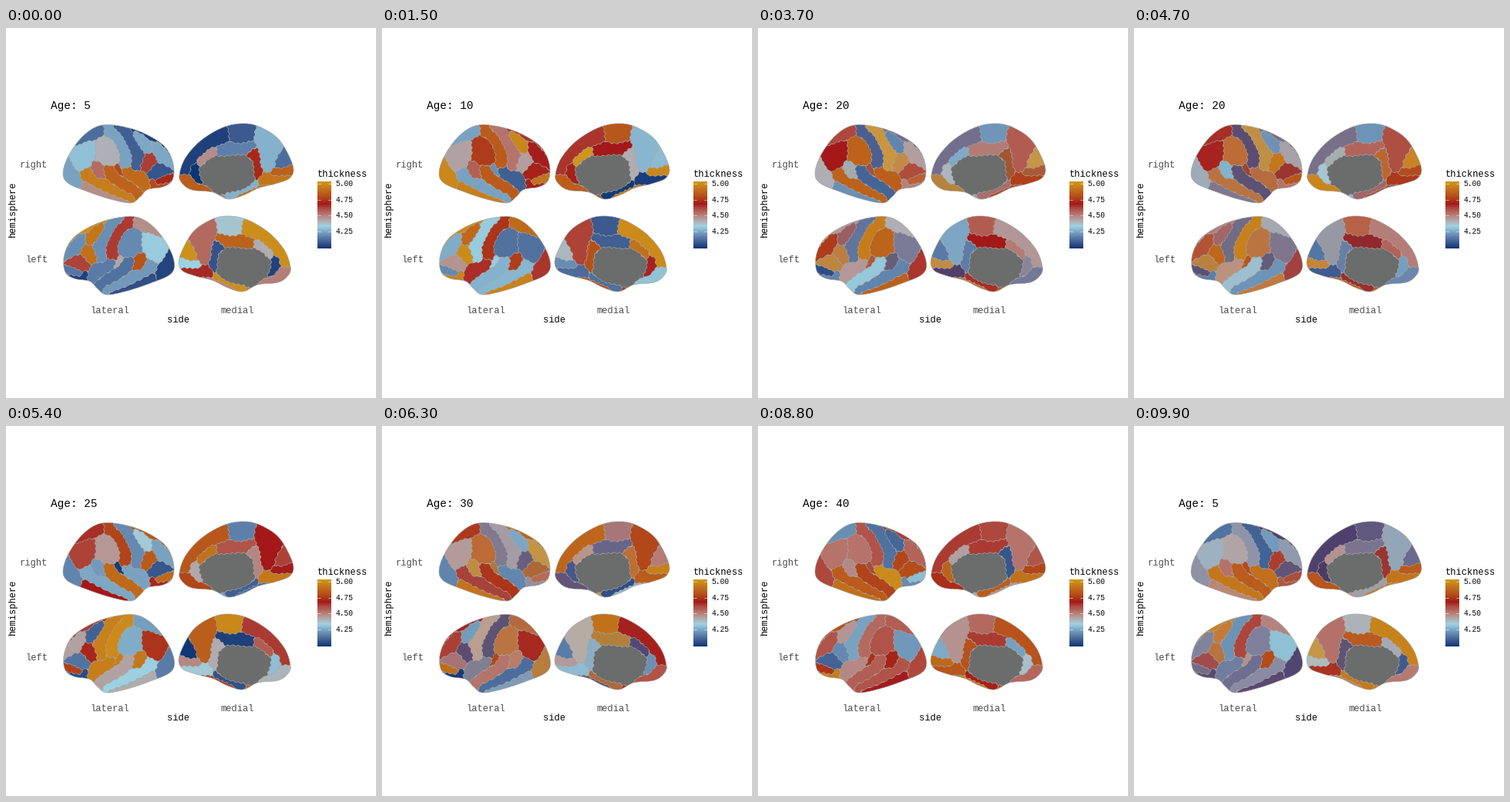
Write a matplotlib script that moves like this. It is 480x480 px and loops after 10 s.

```python
import numpy as np
import matplotlib.pyplot as plt
from matplotlib.animation import FuncAnimation
from matplotlib.patches import Polygon
from matplotlib.path import Path

SIZE, FRAMES, INTERVAL = 480, 100, 100
AGES = np.arange(5, 45, 5)
FADE = 5
PT = 0.72  # points per pixel at 100 dpi
MONO = "Liberation Mono"
EDGE, GREY, WHITE = (166, 168, 164), (108, 108, 108), (255, 255, 255)
X0, X1, Y0, Y1, SUB = 70, 380, 120, 350, 3  # painted box and subpixels

rng = np.random.default_rng(12)

# --- colour scale, interpolated in CIE Lab ---------------------------------
M = np.array([[0.4124, 0.3576, 0.1805],
              [0.2126, 0.7152, 0.0722],
              [0.0193, 0.1192, 0.9505]])
WP = M.sum(axis=1)


def to_lab(rgb):
    c = np.asarray(rgb, float) / 255
    lin = np.where(c > 0.04045, ((c + 0.055) / 1.055) ** 2.4, c / 12.92)
    t = lin @ M.T / WP
    f = np.where(t > 0.008856, np.cbrt(t), 7.787 * t + 16 / 116)
    x, y, z = np.moveaxis(f, -1, 0)
    return np.stack([116 * y - 16, 500 * (x - y), 200 * (y - z)], -1)


def to_rgb(lab):
    L, a, b = np.moveaxis(np.asarray(lab, float), -1, 0)
    y = (L + 16) / 116
    f = np.stack([y + a / 500, y, y - b / 200], -1)
    t = np.where(f > 0.2069, f ** 3, (f - 16 / 116) / 7.787)
    lin = np.clip((t * WP) @ np.linalg.inv(M).T, 0, 1)
    return np.clip(np.where(lin > 0.0031308, 1.055 * lin ** (1 / 2.4) - 0.055,
                            12.92 * lin), 0, 1)


STOPS = to_lab([(10, 52, 114), (158, 210, 226), (164, 22, 25), (208, 152, 26)])


def scale(v):
    """Lab colours for values from 0 (thin) to 100 (thick)."""
    pos = np.linspace(0, 100, len(STOPS))
    return np.stack([np.interp(v, pos, s) for s in STOPS.T], -1)


# --- geometry ---------------------------------------------------------------
def smooth(flat, n=10):
    """Closed Catmull-Rom curve."""
    p = np.reshape(flat, (-1, 2)).astype(float)
    a, b, c, d = (np.roll(p, s, axis=0)[:, None] for s in (1, 0, -1, -2))
    t = np.linspace(0, 1, n, endpoint=False)[None, :, None]
    q = 0.5 * (2 * b + (c - a) * t + (2 * a - 5 * b + 4 * c - d) * t ** 2
               + (3 * b - a - 3 * c + d) * t ** 3)
    return q.reshape(-1, 2)


def spine_dist(p, spine):
    """Distance from points to a polyline."""
    best = np.inf
    for a, b in zip(spine[:-1], spine[1:]):
        t = np.clip((p - a) @ (b - a) / ((b - a) @ (b - a)), 0, 1)
        best = np.minimum(best, np.hypot(*(p - a - t[:, None] * (b - a)).T))
    return best


def waver(p):
    x, y = p.T
    return p + np.stack([0.7 * np.sin(0.9 * y + 0.35 * x),
                         0.7 * np.sin(0.85 * x - 0.4 * y)], 1)


class View:
    """One face of the right hemisphere; the left one is its mirror image."""

    def __init__(self, outline, mirror, width, drop):
        self.outline = smooth(outline)
        self.mirror, self.width, self.drop = mirror, width, drop
        self.areas, self.tracks = [], ([], [])

    def area(self, radius, spine, right=None, left=None):
        """Rounded cell around a spine; unkeyed areas vary at random."""
        self.areas.append((radius, np.reshape(spine, (-1, 2)).astype(float)))
        for track, keys in zip(self.tracks, (right, left)):
            track.append(scale(rng.uniform(0, 100, len(AGES)) if keys is None else keys))

    def void(self, radius, spine):
        self.area(radius, spine)
        for track in self.tracks:
            track[-1] = np.tile(to_lab(GREY), (len(AGES), 1))

    def flip(self, p):
        return np.stack([self.mirror - self.width * p[:, 0], p[:, 1] + self.drop], 1)

    def unflip(self, p):
        return np.stack([(self.mirror - p[:, 0]) / self.width, p[:, 1] - self.drop], 1)

    def paint(self, labels, grid, left, base):
        """Give each subpixel to its nearest area, -2 along the borders."""
        p = self.unflip(grid) if left else grid
        inside = np.flatnonzero(Path(self.outline).contains_points(p))
        q = waver(p[inside])
        d = np.array([spine_dist(q, s) - r for r, s in self.areas])
        first, second = np.partition(d, 1, axis=0)[:2]
        labels[inside] = np.where(second - first < 0.7, -2, base + d.argmin(axis=0))


lateral = View([74, 187, 82, 164, 100, 140, 122, 126.5, 150, 127.5, 180, 137, 206, 154,
                217, 176, 216, 197, 204, 206, 184, 209.5, 174, 219, 162, 227,
                135, 222, 105, 212, 80, 201], 292.5, 1, 119)
medial = View([225, 190, 233, 168, 254, 145, 284, 128, 312, 124, 335, 131, 356, 147,
               372, 178, 369, 194, 350, 202, 328, 207.5, 308, 217, 288, 222,
               268, 213, 241, 210, 228, 201], 589.5, 0.98, 120)

# superior frontal, seen on both faces
frontal = ([3, 63, 60, 15, 81, 86, 34, 62], [97, 96, 30, 47, 62, 67, 31, 80])
lateral.area(3, [150, 125, 172, 132, 195, 143, 210, 157, 218, 172], *frontal)
medial.area(12, [230, 178, 243, 160, 262, 145, 276, 139], *frontal)
# rostral and caudal middle frontal
lateral.area(8, [197, 156, 210, 172],
             [25, 66, 46, 43, 24, 98, 67, 55], [20, 26, 74, 74, 43, 66, 66, 58])
lateral.area(6, [170, 140, 184, 156])
# precentral, postcentral
lateral.area(7, [145, 124, 157, 137, 166, 155, 172, 165, 168, 180],
             [10, 52, 42, 98, 19, 43, 67, 14], [20, 32, 42, 12, 93, 42, 57, 24])
lateral.area(7, [132, 124, 135, 134, 146, 146, 154, 160, 156, 176],
             [24, 82, 40, 6, 76, 18, 4, 58], [62, 72, 90, 92, 96, 5, 82, 54])
# parietal: supramarginal, superior, inferior
lateral.area(15, [130, 157, 132, 165],
             [40, 74, 84, 84, 45, 83, 74, 52], [19, 14, 84, 85, 26, 85, 75, 58])
lateral.area(10, [98, 141, 118, 130],
             [13, 24, 45, 64, 64, 74, 67, 20], [47, 86, 38, 41, 23, 82, 51, 56])
lateral.area(12, [93, 173, 106, 158],
             [30, 43, 67, 67, 61, 40, 46, 52], [32, 14, 58, 18, 72, 65, 98, 22])
# lateral occipital
lateral.area(11, [80, 180, 85, 199],
             [24, 95, 45, 39, 18, 18, 58, 60], [4, 63, 58, 64, 16, 92, 22, 60])
# temporal: superior, middle, inferior, transverse, sulcal bank
lateral.area(7, [132, 183, 143, 195, 157, 206, 170, 214],
             [84, 82, 33, 6, 86, 69, 4, 76], [14, 27, 33, 31, 43, 54, 75, 56])
lateral.area(6, [104, 190, 122, 202, 140, 212, 160, 220],
             [92, 24, 80, 85, 25, 66, 68, 82], [22, 28, 18, 18, 33, 8, 97, 58])
lateral.area(4, [104, 206, 130, 218, 155, 226])
lateral.area(3, [143, 181, 151, 191])
lateral.area(7, [121, 180, 120, 189])
# insula
lateral.area(8, [158, 187, 172, 194, 179, 203],
             [86, 10, 83, 83, 24, 17, 18, 96], [16, 64, 45, 45, 92, 17, 15, 48])
# inferior frontal and orbital
lateral.area(7, [186, 170, 181, 179])
lateral.area(7, [192, 189, 204, 183])
lateral.area(4, [199, 200, 209, 196])
lateral.area(4, [189, 201, 192, 206, 212, 206])

# paracentral, precuneus
medial.area(15, [305, 126, 305, 136],
            [9, 81, 20, 22, 17, 52, 92, 60], [36, 9, 54, 57, 95, 87, 72, 54])
medial.area(12, [337, 140, 343, 157, 339, 172],
            [27, 28, 55, 57, 67, 79, 43, 52], [54, 61, 24, 25, 83, 37, 73, 46])
# cingulate: posterior, isthmus, caudal and rostral anterior
medial.area(8, [280, 160, 300, 157, 313, 155],
            [17, 67, 30, 54, 58, 12, 67, 62], [84, 10, 67, 67, 3, 98, 67, 62])
medial.area(6, [319, 163, 327, 170, 325, 190])
medial.area(7, [254, 172, 268, 161])
medial.area(6, [243, 180, 247, 192, 252, 200])
# occipital: cuneus, pericalcarine, lingual
medial.area(8, [364, 167, 356, 174])
medial.area(5, [350, 187, 371, 186])
medial.area(6, [334, 196, 352, 198, 368, 197])
# inner temporal
medial.area(4, [340, 208, 322, 212, 305, 219])
medial.area(4, [322, 203, 306, 211, 288, 217])
medial.area(3, [279, 221, 283, 221])
# orbitofrontal, corpus callosum
medial.area(7, [230, 197, 245, 205, 264, 211])
medial.void(25, [275, 190, 299, 189])

# --- stage -------------------------------------------------------------------
fig = plt.figure(figsize=(4.8, 4.8), dpi=100, facecolor="white")
ax = fig.add_axes([0, 0, 1, 1])
ax.axis("off")

W, H = X1 - X0, Y1 - Y0
gx, gy = np.meshgrid(X0 + (np.arange(W * SUB) + 0.5) / SUB,
                     Y0 + (np.arange(H * SUB) + 0.5) / SUB)
grid = np.stack([gx.ravel(), gy.ravel()], 1)
labels = np.full(len(grid), -1)
tracks = []
for view in (lateral, medial):
    for left in (False, True):
        view.paint(labels, grid, left, len(tracks))
        tracks += view.tracks[left]
        rim = view.flip(view.outline) if left else view.outline
        ax.add_patch(Polygon(rim, fill=False, ec=np.array(EDGE) / 255, lw=0.6 * PT))
labels = labels.reshape(H * SUB, W * SUB)
tracks = np.array(tracks)

brain = ax.imshow(np.ones((H, W, 3)), extent=(X0, X1, Y1, Y0), aspect="auto",
                  interpolation="nearest")


def label(x, y, s, px, color="black", ha="left", **kw):
    kw = {"va": "baseline", **kw}
    return ax.text(x, y, s, fontsize=px * PT, family=MONO, color=color, ha=ha, **kw)


AXIS = "#4d4d4d"
title = label(58, 105, "", 14.4)
for s, y in (("right", 180.5), ("left", 304.5)):
    label(54, y, s, 12, AXIS, "right")
for s, x in (("lateral", 135), ("medial", 300.5)):
    label(x, 369.5, s, 12, AXIS, "center")
label(223, 381.5, "side", 12, ha="center")
label(15, 234.5, "hemisphere", 12, ha="right", va="center", rotation=90)
label(404, 193, "thickness", 12)

bar = to_rgb(scale(np.linspace(100, 0, 200)))[:, None]
ax.imshow(bar, extent=(404, 421.5, 286, 199), aspect="auto", interpolation="bilinear")
for i in range(4):
    y = 202 + 20.6 * i
    label(427.5, y + 3.2, f"{5 - i / 4:.2f}", 9.6)
    for x in (404, 418):
        ax.plot([x, x + 3.5], [y, y], color="white", lw=0.5 * PT)
ax.set(xlim=(0, SIZE), ylim=(SIZE, 0))


def start(k):
    """Frame at which state k is reached; spare frames go to the early states."""
    base, spare = divmod(FRAMES, len(AGES))
    return base * k + min(max(k - 1, 0), spare)


def draw(n):
    k = max(i for i in range(len(AGES)) if start(i) <= n)
    nxt = (k + 1) % len(AGES)
    p = max(0, n - start(k + 1) + FADE) / FADE
    colors = to_rgb(tracks[:, k] * (1 - p) + tracks[:, nxt] * p)
    palette = np.vstack([colors, np.array([EDGE, WHITE]) / 255])
    brain.set_data(palette[labels].reshape(H, SUB, W, SUB, 3).mean(axis=(1, 3)))
    title.set_text(f"Age: {AGES[nxt if p > 0.5 else k]}")
    return brain, title


anim = FuncAnimation(fig, draw, frames=FRAMES, interval=INTERVAL, repeat=True,
                     repeat_delay=0, blit=False)
plt.show()
```
